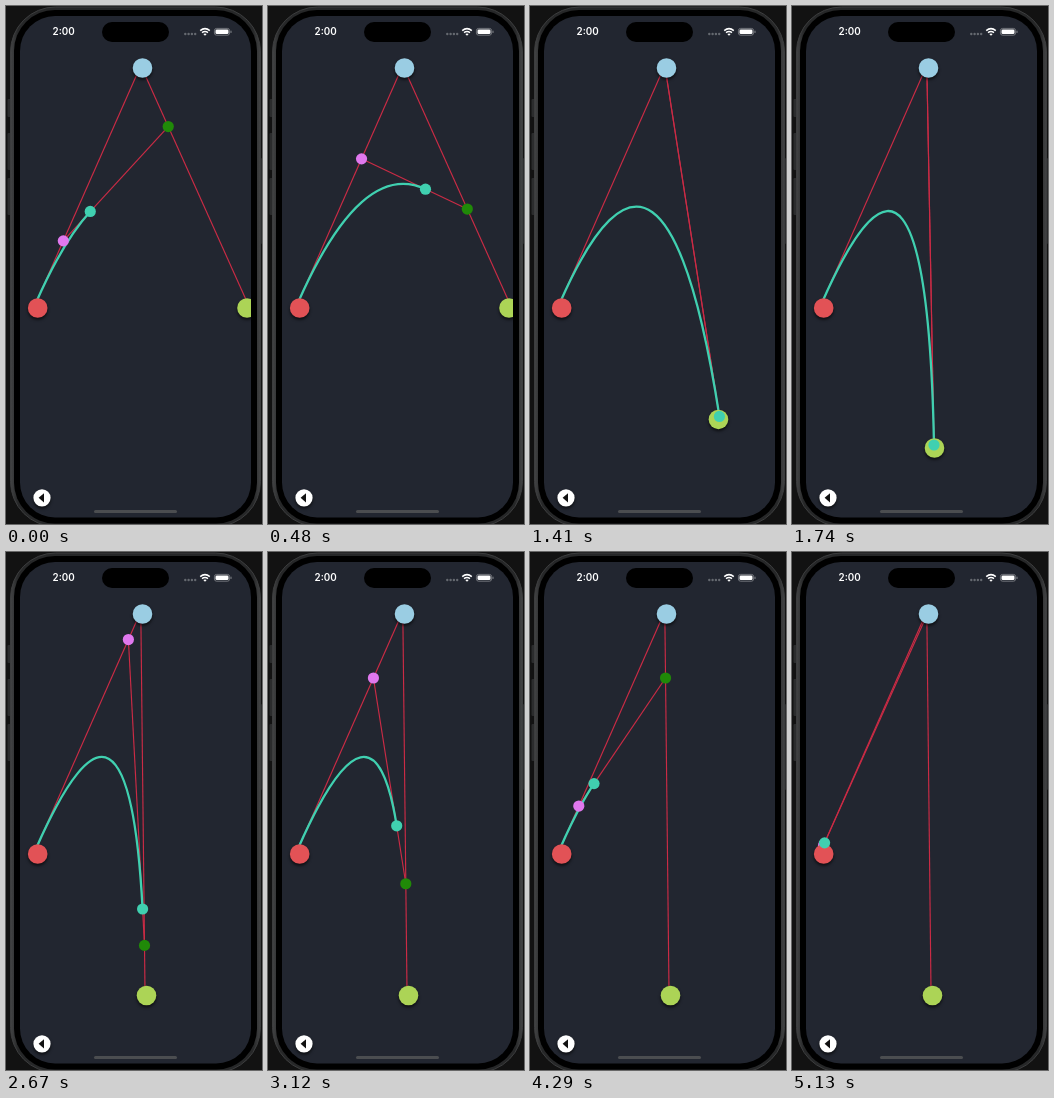
Write an HTML page that moves like this. It is 256x518 px and loops after 5.16 s.

```html
<!DOCTYPE html>
<html lang="en">
<head>
<meta charset="utf-8">
<title>Quadratic curve</title>
<style>
  html, body { margin: 0; width: 100%; height: 100%; overflow: hidden; background: #121212; }
  svg { display: block; width: 256px; height: 518px; }
  .time { font: 600 9.8px Inter, Roboto, sans-serif; fill: #fff; }
  .line { stroke: #cb2b45; stroke-width: 1.15; fill: none; }
  .handle { filter: drop-shadow(0 2px 1.5px rgba(0, 0, 0, .65)); }
</style>
</head>
<body>
<svg viewBox="0 0 256 518">
  <defs>
    <linearGradient id="rim" x1="0" x2="1">
      <stop offset="0" stop-color="#434445"/>
      <stop offset=".03" stop-color="#262728"/>
      <stop offset=".97" stop-color="#262728"/>
      <stop offset="1" stop-color="#434445"/>
    </linearGradient>
    <clipPath id="screen"><rect x="14" y="10" width="231" height="501.5" rx="35"/></clipPath>
  </defs>

  <!-- phone body -->
  <g fill="#2b2c2d">
    <rect x="1.5" y="93" width="4" height="18" rx="1"/>
    <rect x="1.5" y="127" width="4" height="37" rx="1"/>
    <rect x="1.5" y="172" width="4" height="37" rx="1"/>
    <rect x="252" y="152" width="4" height="86" rx="1"/>
  </g>
  <rect x="4.5" y="1" width="250" height="519.5" rx="45" fill="url(#rim)" stroke="#3c3d3e"/>
  <rect x="8" y="4" width="243" height="513.5" rx="41" fill="#000"/>

  <g clip-path="url(#screen)">
    <rect x="14" y="10" width="231" height="502" fill="#222630"/>

    <line id="leg0" class="line"/>
    <line id="leg1" class="line"/>
    <line id="link" class="line"/>
    <path id="curve" fill="none" stroke="#40d0b0" stroke-width="2.3"/>
    <circle id="dotA" r="5.6" fill="#e078ee"/>
    <circle id="dotB" r="5.6" fill="#208a08"/>
    <circle class="handle" cx="31.7" cy="302" r="9.8" fill="#e25256"/>
    <circle class="handle" cx="136.5" cy="62" r="9.8" fill="#9acde3"/>
    <circle class="handle" id="end" r="9.8" fill="#acd456"/>
    <circle id="dotC" r="5.6" fill="#40d0b0"/>

    <!-- back button -->
    <circle class="handle" cx="36" cy="491.8" r="8.6" fill="#fff"/>
    <path d="M38 487.2V496.4L32.6 491.8Z" fill="#111"/>
    <rect x="88" y="504" width="83" height="3" rx="1.5" fill="#4b4d50"/>
  </g>

  <!-- status bar -->
  <rect x="96" y="16" width="67" height="20" rx="10" fill="#000"/>
  <text class="time" x="46.6" y="29.3">2:00</text>
  <g fill="#656970">
    <circle cx="179.3" cy="28" r="1.2"/><circle cx="182.6" cy="28" r="1.2"/>
    <circle cx="185.9" cy="28" r="1.2"/><circle cx="189.2" cy="28" r="1.2"/>
  </g>
  <g fill="none" stroke="#fff" stroke-width="1.5">
    <path d="M194.2 24.6Q199 20.6 203.8 24.6"/>
    <path d="M196 26.6Q199 24.2 202 26.6"/>
  </g>
  <path d="M197.3 28.1Q199 26.9 200.7 28.1L199 29.8Z" fill="#fff"/>
  <rect x="208.4" y="22.4" width="15.2" height="6.8" rx="2.2" fill="none" stroke="#84878c" stroke-width=".8"/>
  <rect x="209.5" y="23.5" width="13" height="4.6" rx="1.3" fill="#fff"/>
  <rect x="224.5" y="24.6" width="1" height="2.4" rx=".5" fill="#84878c"/>
</svg>
<script>
const LOOP = 5160, STEP = 30;
const start = [30.5, 295.5], control = [134.8, 59.5];

// time, progress along the curve
const progress = [
  [0, .257], [540, .65], [960, .99], [1200, 1], [1900, 1], [2190, .98], [2670, .881],
  [3270, .654], [3600, .489], [4290, .1755], [4890, .035], [5130, .01]
];
// time, handle x, handle y, curve end offset x, y
const drag = [
  [0, 241, 302, .5, -5], [585, 241, 302, .5, -5], [900, 228, 359, 1.5, -3],
  [1110, 228, 359.5, 1.5, -3], [1400, 190, 412, 1, -3], [1650, 147, 441, -.5, -3],
  [1740, 142.5, 442, -.5, -3], [2150, 140.5, 443.5, -1.5, -5], [LOOP, 140.5, 443.5, -1.5, -5]
];

const $ = id => document.getElementById(id);
const mix = (a, b, t) => a.map((v, i) => v + (b[i] - v) * t);

// Monotone cubic interpolation of one table column.
function sample(table, time, col = 1) {
  const last = table.length - 1;
  if (time >= table[last][0]) return table[last][col];
  let i = 0;
  while (time >= table[i + 1][0]) i++;
  const slope = k => (table[k + 1][col] - table[k][col]) / (table[k + 1][0] - table[k][0]);
  const tangent = k => {
    if (k === 0) return slope(0);
    if (k === last) return slope(last - 1);
    const a = slope(k - 1), b = slope(k);
    return a * b <= 0 ? 0 : 2 * a * b / (a + b);
  };
  const h = table[i + 1][0] - table[i][0];
  const u = (time - table[i][0]) / h, v = 1 - u;
  return table[i][col] * (1 + 2 * u) * v * v + table[i + 1][col] * u * u * (3 - 2 * u)
    + h * u * v * (tangent(i) * v - tangent(i + 1) * u);
}

function place(id, [x, y]) {
  $(id).setAttribute('cx', x);
  $(id).setAttribute('cy', y);
}

function join(id, a, b) {
  const el = $(id);
  el.setAttribute('x1', a[0]);
  el.setAttribute('y1', a[1]);
  el.setAttribute('x2', b[0]);
  el.setAttribute('y2', b[1]);
}

function draw(time) {
  const [x, y, dx, dy] = [1, 2, 3, 4].map(col => sample(drag, time, col));
  const t = sample(progress, time);
  const end = [x + dx, y + dy];
  const a = mix(start, control, t), b = mix(control, end, t), c = mix(a, b, t);
  join('leg0', start, control);
  join('leg1', control, end);
  join('link', a, b);
  $('curve').setAttribute('d', `M${start}Q${a} ${c}`);
  place('dotA', a);
  place('dotB', b);
  place('dotC', c);
  place('end', [x, y]);
}

const origin = performance.now();
function tick() {
  const time = (performance.now() - origin) % LOOP;
  draw(Math.floor(time / STEP) * STEP);
  requestAnimationFrame(tick);
}
tick();
</script>
</body>
</html>
```
